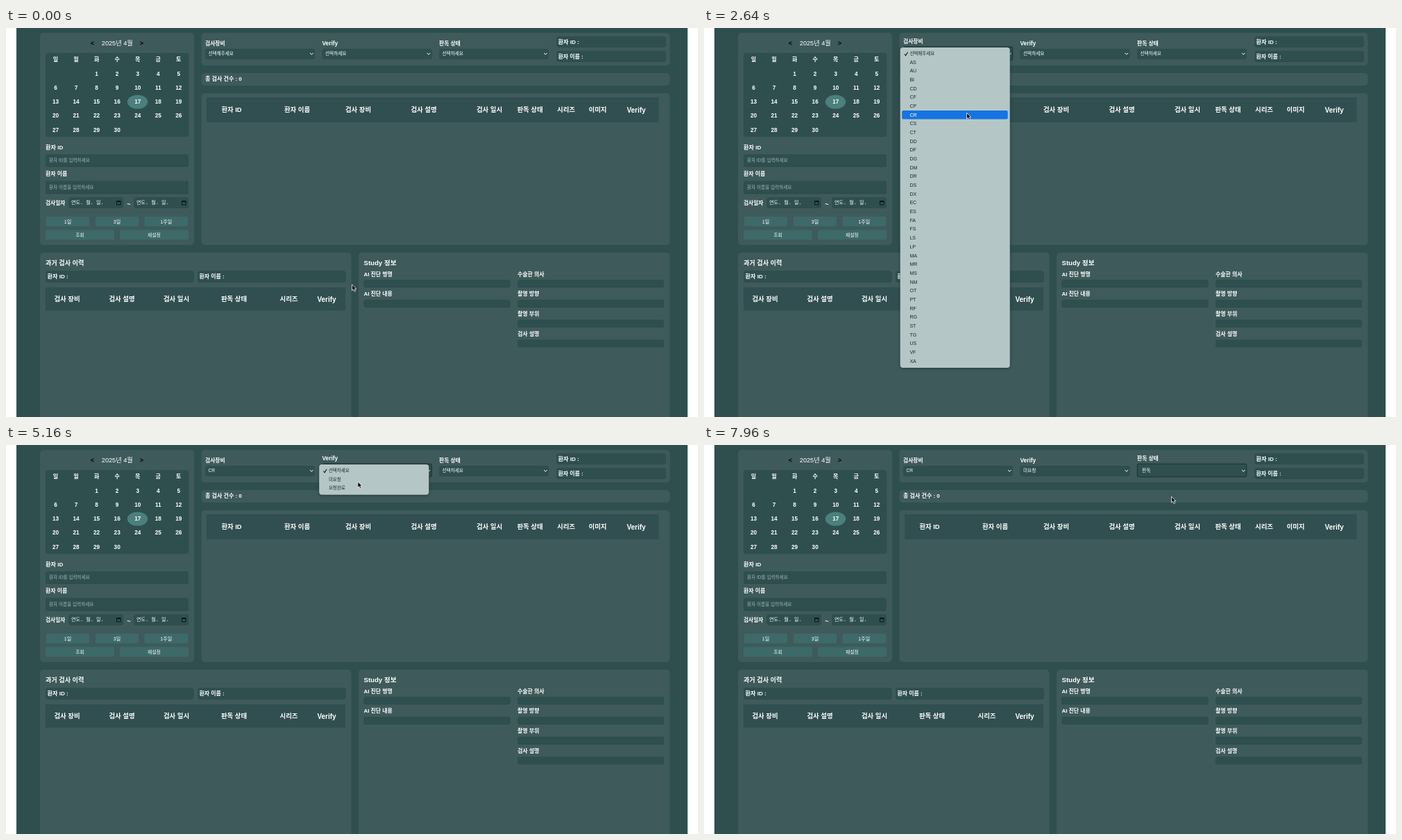
These frames come from a looping animation (997x561 px, 8 s). An HTML page:

```html
<!DOCTYPE html>
<html lang="ko">
<head>
<meta charset="utf-8">
<style>
html, body { margin: 0; width: 100%; height: 100%; overflow: hidden; background: #fff; }
svg { display: block; width: 997px; height: 561px; }
text { font-family: "Liberation Sans", "Noto Sans CJK KR", "Noto Sans CJK", sans-serif; fill: #fff; white-space: pre; }
.b { font-weight: 700; }
.mid { text-anchor: middle; }
.hint { fill: #a3b3b3; }
.mono { font-family: "Liberation Mono", "Noto Sans CJK KR", "Noto Sans CJK", monospace; }
.ink { fill: #000; }
.panel { fill: #3e5a5a; }
.dark { fill: #2f4f4f; }
.head { fill: #314f50; }
.btn { fill: #3d6a69; }
.line { fill: none; stroke: #fff; stroke-width: 1; }
.menu text { fill: #1d2929; }
.menu text.on { fill: #fff; }
.sheet { fill: #b4c7c6; filter: drop-shadow(0 1px 2px rgba(0, 0, 0, .35)); }
.hover { fill: #1573e2; }
.focus rect { stroke: #1b3030; stroke-width: 1; }
</style>
</head>
<body>
<svg id="stage" viewBox="0 0 997 561"></svg>
<script>
const LOOP = 8000, ROW = 12.67, TOP = 36.5;
const stage = document.getElementById('stage');

const rect = (x1, y1, x2, y2, cls, r = 0) =>
  `<rect x="${x1}" y="${y1}" width="${x2 - x1}" height="${y2 - y1}" rx="${r}" class="${cls}"/>`;
const text = (s, x, y, size, cls = '') =>
  `<text x="${x}" y="${y + size * .365}" font-size="${size}" class="${cls}">${s}</text>`;
const field = (x1, y1, x2, y2, r = 3) =>
  `<g>${rect(x1, y1 + .7, x2, y2 + .7, '" fill="#2a4545', r)}${rect(x1, y1, x2, y2, 'dark', r)}</g>`;
const row = (items, y) => items.map(([s, x]) =>
  text(s, x, y, s === 'Verify' ? 10 : 9.4, 'b mid')).join('');

function calendar() {
  const col = i => 71.5 + 29.55 * i;
  let out = text('&lt;', 124.5, 22, 9, 'b mid ink') + text('2025년 4월', 160.3, 22, 9.2, 'mid')
    + text('&gt;', 195.5, 22, 9, 'b mid ink') + rect(57, 36, 263.5, 157, 'dark', 4)
    + '<ellipse cx="189.5" cy="106.6" rx="14.7" ry="10" fill="#4a807d"/>';
  [...'일월화수목금토'].forEach((d, i) => out += text(d, col(i), 45.3, 8, 'b mid'));
  for (let d = 1; d <= 30; d++) {
    const cell = d + 1;
    out += text(d, col(cell % 7), 66.2 + 20.1 * Math.floor(cell / 7), 8.2, 'b mid');
  }
  return out;
}

function dateField(x) {
  return field(x, 244, x + 78.5, 259) + text('연도. 월. 일.', x + 3.5, 251.6, 7, 'mono')
    + `<path d="M${x + 69} 249.5h5.6v5.6h-5.6zM${x + 69} 250.5h5.6" fill="none" stroke="#0c1414" stroke-width="1"/>`;
}

function searchPanel() {
  const button = (s, x1, x2, y, size) =>
    rect(x1, y, x2, y + 14, 'btn', 2) + text(s, (x1 + x2) / 2, y + 7, size, 'mid');
  return rect(49, 7, 271, 313, 'panel', 5) + calendar()
    + text('환자 ID', 57, 172, 8.1, 'b') + field(57, 182, 263, 199.5)
    + text('환자 ID를 입력하세요', 62, 191, 6.6, 'hint')
    + text('환자 이름', 57, 210.5, 7.9, 'b') + field(57, 220.5, 263, 238.5)
    + text('환자 이름을 입력하세요', 62, 229.5, 6.6, 'hint')
    + text('검사일자', 57, 251.7, 7.7, 'b') + dateField(90.5) + text('~', 177, 253.5, 9, 'b mid') + dateField(184.5)
    + button('1일', 58, 120, 272, 7.1) + button('3일', 129, 191, 272, 7.1) + button('1주일', 199.5, 262, 272, 7.1)
    + button('조회', 57, 156, 291.3, 6.7) + button('재설정', 164, 263, 291.3, 6.8);
}

function resultPanels() {
  return rect(281.5, 7, 956.5, 54, 'panel', 5)
    + field(793, 12, 951, 27, 4) + text('환자 ID :', 795.5, 19.7, 8.1, 'b')
    + field(793, 33, 951, 48, 4) + text('환자 이름 :', 795.5, 41, 7.9, 'b')
    + rect(281.5, 65, 956.5, 83, 'panel', 5) + text('총 검사 건수 : 0', 287, 73.2, 8, 'b')
    + rect(281.5, 94, 956.5, 313, 'panel', 5) + rect(289, 100, 940.5, 136, 'head')
    + row([['환자 ID', 325], ['환자 이름', 419.5], ['검사 장비', 507.5], ['검사 설명', 602], ['검사 일시', 696.5],
      ['판독 상태', 755], ['시리즈', 807], ['이미지', 852.5], ['Verify', 908]], 118);
}

function historyPanel() {
  return rect(49, 324, 497.5, 570, 'panel', 5) + text('과거 검사 이력', 57, 338.7, 9.1, 'b')
    + field(57, 350, 270.5, 366, 4) + text('환자 ID :', 59.5, 357.8, 8.1, 'b')
    + field(276, 350, 489.5, 366, 4) + text('환자 이름 :', 278.5, 357.8, 7.9, 'b')
    + rect(57, 374, 489, 407.5, 'head')
    + row([['검사 장비', 88], ['검사 설명', 167], ['검사 일시', 245.5], ['판독 상태', 328.5],
      ['시리즈', 407.5], ['Verify', 462]], 391);
}

function studyPanel() {
  const column = (names, x) => names.map((s, i) =>
    text(s, x, 354.7 + 28.8 * i, 7.9, 'b') + field(x, 363 + 28.8 * i, x + 211, 373.5 + 28.8 * i)).join('');
  return rect(508, 324, 956.5, 570, 'panel', 5) + text('Study 정보', 515.5, 338.7, 9.6, 'b')
    + column(['AI 진단 병명', 'AI 진단 내용'], 515.5)
    + column(['수술한 의사', '촬영 방향', '촬영 부위', '검사 설명'], 737);
}

// Drop-downs: opened at `open`, picked at `pick`, focused until `blur`
const codes = ('AS AU BI CD CF CP CR CS CT DD DF DG DM DR DS DX EC ES FA FS LS LP '
  + 'MA MR MS NM OT PT RF RG ST TG US VF XA').split(' ');
const selects = [
  { name: '검사장비', x: 287, items: ['선택해주세요', ...codes], value: 7, open: 1680, pick: 2940, blur: 3920 },
  { name: 'Verify', x: 455.5, items: ['선택하세요', '미요청', '요청완료'], value: 1, open: 3920, pick: 5130, blur: 5960 },
  { name: '판독 상태', x: 624, items: ['선택하세요', '읽지않음', '열람중', '판독'], value: 3, open: 5960, pick: 7180, blur: LOOP }
];
const BLINK = 80, FADE_AT = 130, FADE = 220;

const selectBox = (s, i) => `<g id="label${i}">${text(s.name, s.x, 21.7, i === 1 ? 8.3 : 7.75, 'b')}</g>`
  + `<g id="idle${i}">${field(s.x, 30, s.x + 158, 44)}${text('', s.x + 4.5, 37, 6.6)}</g>`
  + `<g id="focus${i}" class="focus">${rect(s.x + .3, 27.3, s.x + 157.7, 46, 'dark', 2)}${text('', s.x + 7, 37, 6.8)}</g>`
  + `<path class="line" d="M${s.x + 151} 36l2.3 2.3l2.3-2.3"/>`;

function menu(s, i) {
  const x = s.x - 4.3, end = TOP + ROW * (s.items.length - 1) + 10;
  return `<g id="menu${i}" class="menu">${rect(x, 28, x + 158, end, 'sheet', 4)}`
    + `<g id="hover${i}">${rect(x + 2.5, 30.2, x + 155, 42.8, 'hover', 2)}</g>`
    + `<path d="M${x + 6.3} 37.5l1.6 2.3l3-5" fill="none" stroke="#111" stroke-width="1.1"/>`
    + s.items.map((item, n) => text(item, x + 13.7, TOP + ROW * n, n && !i ? 7.1 : 6.5)).join('') + '</g>';
}

stage.innerHTML = rect(15, 0, 982, 561, 'dark') + searchPanel() + resultPanels() + historyPanel() + studyPanel()
  + selects.map(selectBox).join('') + selects.map(menu).join('')
  + '<path id="cursor" d="M0 0V8.6L2 6.8L3.5 10L5.1 9.3L3.7 6.2H6.3Z" fill="#000" stroke="#fff" stroke-width=".8"/>';

const get = id => document.getElementById(id);
selects.forEach((s, i) => {
  for (const part of ['label', 'idle', 'focus', 'menu', 'hover']) s[part] = get(part + i);
  s.rows = [...s.menu.querySelectorAll('text')];
});
const cursor = get('cursor');

// time, x, y
const path = [
  [0, 498.5, 370], [500, 498.5, 370], [640, 385, 106], [840, 385, 106], [1600, 409, 36], [2120, 409, 36],
  [2240, 406.5, 54.5], [2640, 378.5, 122.5], [3290, 378.5, 122.5], [3560, 504.5, 34.5], [4760, 504.5, 34.5],
  [5000, 506.8, 53], [5570, 506.8, 53], [5840, 674.5, 38], [6400, 674.5, 38], [7000, 673.5, 74.5], [LOOP, 673.5, 74.5]
];

function pointer(t) {
  const n = path.findIndex(p => p[0] > t);
  const [t0, x0, y0] = path[n - 1], [t1, x1, y1] = path[n];
  const u = (t - t0) / (t1 - t0), e = u * u * (3 - 2 * u);
  return [x0 + (x1 - x0) * e, y0 + (y1 - y0) * e];
}

const show = (el, on) => el.style.display = on ? '' : 'none';

function draw(t) {
  const [px, py] = pointer(t);
  cursor.setAttribute('transform', `translate(${px} ${py})`);
  for (const s of selects) {
    const focused = t >= s.open && t < s.blur;
    const gone = s.pick + FADE_AT + FADE;
    const open = t >= s.open && t < gone;
    const value = s.items[t < gone ? 0 : s.value];
    show(s.idle, !focused);
    show(s.focus, focused);
    s.label.setAttribute('transform', `translate(0 ${focused ? -2.8 : 0})`);
    for (const box of [s.idle, s.focus]) box.querySelector('text').textContent = value;

    show(s.menu, open);
    if (!open) continue;
    s.menu.style.opacity = 1 - Math.max(0, (t - s.pick - FADE_AT) / FADE);
    const blink = t >= s.pick && t < s.pick + BLINK;
    const at = t >= s.pick ? s.value : Math.floor((py - 30.2) / ROW);
    const lit = !blink && at >= 0 && at < s.items.length;
    show(s.hover, lit);
    s.hover.setAttribute('transform', `translate(0 ${at * ROW})`);
    s.rows.forEach((r, n) => r.classList.toggle('on', lit && n === at));
  }
}

const start = performance.now();
function tick() {
  draw((performance.now() - start) % LOOP);
  requestAnimationFrame(tick);
}
tick();
</script>
</body>
</html>
```
